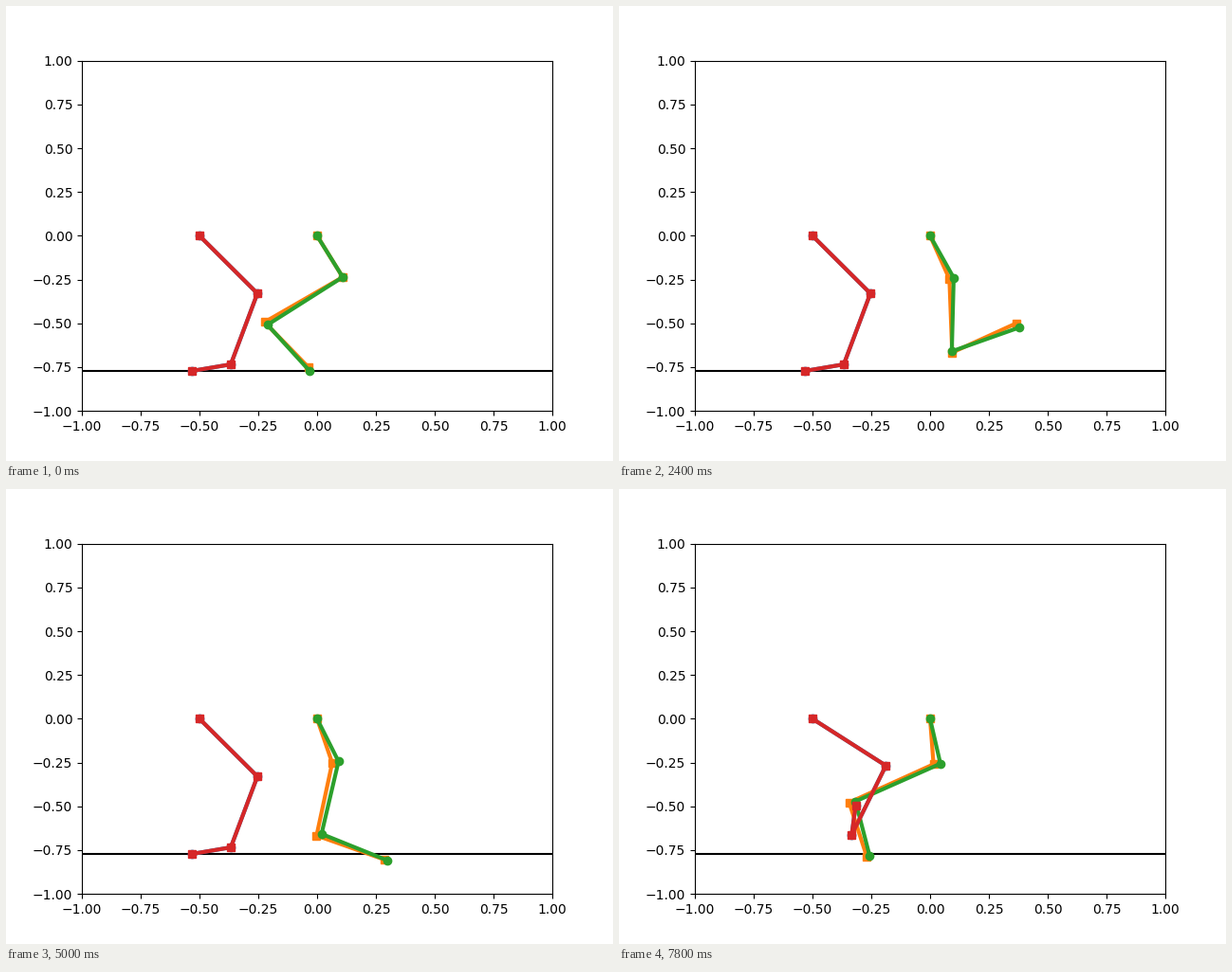
Write a matplotlib script that moves like this. It is 640 by 480 pixels and loops after 8000 ms.

```python
import numpy as np
import matplotlib.pyplot as plt
from matplotlib.animation import FuncAnimation

STEP = 0.2      # seconds per frame
FRAMES = 40
GROUND = -0.7716

FORE_LINKS = np.array([0.26, 0.42, 0.319])
HIND_LINKS = np.array([0.411, 0.4205, 0.169])

# Key poses: time, then the angle of each link in degrees from straight down
FORE_POSES = np.array([
    (0.2, 24.8, -49.6, 34.2),
    (1.0, 24.8, -46.7, 78.7),
    (1.4, 24.0, -27.0, 110.0),
    (2.4, 22.7, -1.1, 115.4),
    (3.4, 27.5, 13.9, 71.5),
    (5.0, 20.5, -9.9, 61.6),
    (7.0, 10.6, -51.2, 32.9),
    (7.8, 9.7, -59.2, 10.9),
])
HIND_POSES = np.array([
    (6.5, 36.8, -15.6, -77.2),
    (7.0, 36.8, -6.9, -117.3),
    (7.8, 49.4, -20.2, -185.7),
])


def smooth(u):
    u = np.clip(u, 0, 1)
    return u * u * (3 - 2 * u)


def pose(t, poses):
    """Cubic Hermite curve through the key poses, held at both ends."""
    times, angles = poses[:, 0], poses[:, 1:]
    t = np.clip(t, times[0], times[-1])
    slopes = np.gradient(angles, times, axis=0)
    i = min(np.searchsorted(times, t, side="right") - 1, len(times) - 2)
    h = times[i + 1] - times[i]
    u = (t - times[i]) / h
    return (angles[i] + (angles[i + 1] - angles[i]) * smooth(u)
            + h * u * (1 - u) * ((1 - u) * slopes[i] - u * slopes[i + 1]))


def tracking_error(t):
    """Joint errors of the fore leg, added up from the hip down."""
    late = max(t - 1, 0)
    hip = -6.5 * (1 - np.exp(-late / 1.3))
    knee = -2.7 + 9.7 * smooth(late / 1.4)
    ankle = 4.4 - 2.2 * smooth(late / 3)
    return np.cumsum([hip, knee, ankle])


def joints(hip, links, angles):
    a = np.radians(angles)
    x = hip + np.cumsum(np.r_[0, links * np.sin(a)])
    y = np.cumsum(np.r_[0, -links * np.cos(a)])
    return x, y


fig, ax = plt.subplots(figsize=(6.4, 4.8), dpi=100)
ax.set_xlim(-1, 1)
ax.set_ylim(-1, 1)
ax.axhline(GROUND, color="black", lw=1.5)

hind_goal, fore_leg, fore_goal, hind_leg = legs = [
    ax.plot([], [], style, color=f"C{i}", lw=3)[0]
    for i, style in enumerate(["o-", "s-", "o-", "s-"])
]


def draw(frame):
    t = frame * STEP
    hind = joints(-0.5, HIND_LINKS, pose(t, HIND_POSES))
    hind_goal.set_data(*hind)
    hind_leg.set_data(*hind)
    goal = pose(t, FORE_POSES)
    fore_goal.set_data(*joints(0, FORE_LINKS, goal))
    fore_leg.set_data(*joints(0, FORE_LINKS, goal + tracking_error(t)))
    return legs


anim = FuncAnimation(fig, draw, frames=FRAMES, interval=STEP * 1000,
                     repeat=True, repeat_delay=0)
plt.show()
```
